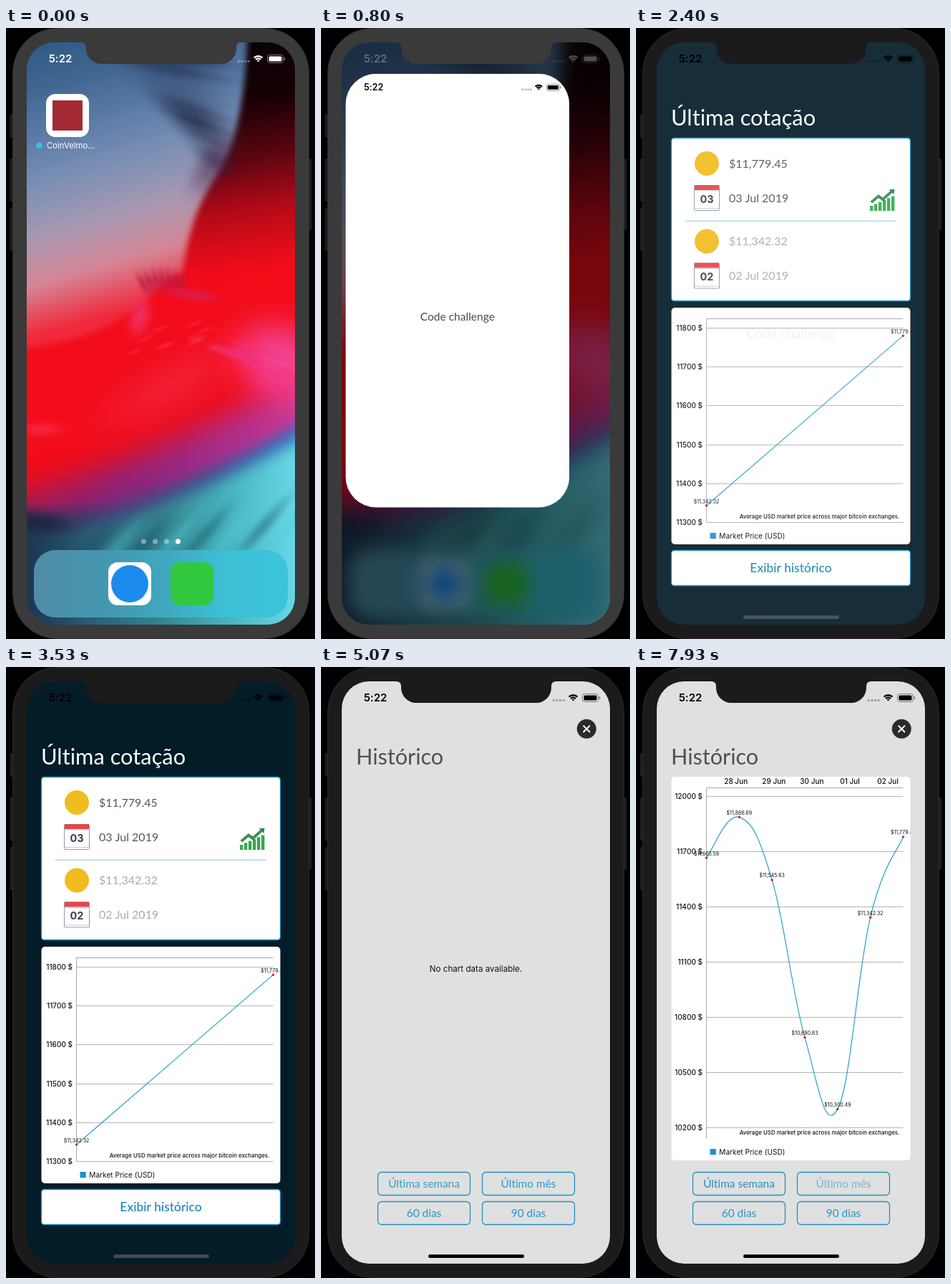
Animation of 432 by 852 pixels, one loop 8 s. Source, as an HTML page with a canvas:

```html
<!DOCTYPE html>
<html lang="pt">
<head>
<meta charset="utf-8">
<title>Cotação</title>
<style>
html, body { margin: 0; width: 100%; height: 100%; overflow: hidden; background: #000; }
canvas { display: block; width: 100vw; height: 100vh; }
</style>
</head>
<body>
<canvas id="stage" width="432" height="852"></canvas>
<script>
const W = 432, H = 852, LOOP = 8000;
const SCREEN = { x: 29, y: 20, w: 375, h: 812 }, MID = 216.5;
const UI = 'Inter, sans-serif', TEXT = 'Lato, sans-serif';
const BLUE = '#1b93c6', NAVY = '#031c28';
const stage = document.getElementById('stage').getContext('2d');
let c = stage;

const clamp = v => Math.max(0, Math.min(1, v));
const mix = (a, b, p) => a + (b - a) * p;
const smooth = v => { v = clamp(v); return v * v * (3 - 2 * v); };
const spring = (ms, rate) => {
  const k = Math.max(0, ms) / 1000 * rate;
  return 1 - (1 + k) * Math.exp(-k);
};
const repeat = (n, fn) => { for (let i = 0; i < n; i++) fn(i, i / (n - 1)); };
function seeded(s) {
  return () => (s = s * 16807 % 2147483647) / 2147483647;
}

function box(x, y, w, h, r, fill, stroke, lw = 1) {
  c.beginPath();
  c.roundRect(x, y, w, h, r);
  if (fill) { c.fillStyle = fill; c.fill(); }
  if (stroke) { c.strokeStyle = stroke; c.lineWidth = lw; c.stroke(); }
}
function disc(x, y, r, fill) {
  c.beginPath();
  c.arc(x, y, r, 0, 7);
  c.fillStyle = fill;
  c.fill();
}
function line(pts, color, lw = 1) {
  c.beginPath();
  pts.forEach(([x, y]) => c.lineTo(x, y));
  c.strokeStyle = color;
  c.lineWidth = lw;
  c.stroke();
}
// y is the middle of the capitals; the tiny spacing turns ligatures off
function label(s, x, y, size, color, align = 'left', font = TEXT, weight = 400) {
  c.font = `${weight} ${size}px ${font}`;
  c.letterSpacing = '0.01px';
  c.textAlign = align;
  c.fillStyle = color;
  c.fillText(s, x, y + size * 0.36);
}
function faded(alpha, draw) {
  c.save();
  c.globalAlpha *= alpha;
  draw();
  c.restore();
}
function layer(draw) {
  const cv = document.createElement('canvas'), prev = c;
  cv.width = W;
  cv.height = H;
  c = cv.getContext('2d');
  draw();
  c = prev;
  return cv;
}

// Wallpaper

function ramp(x0, y0, x1, y1, ...colors) {
  const g = c.createLinearGradient(x0, y0, x1, y1);
  colors.forEach((color, i) => g.addColorStop(i / (colors.length - 1), color));
  return g;
}
function haze(blur, fill, path) {
  c.filter = `blur(${blur}px)`;
  c.fillStyle = fill;
  c.fill(new Path2D(path));
  c.filter = 'none';
}
// soft ellipse, rgb given as 'r,g,b'
function glow(x, y, rx, ry, turn, rgb, alpha) {
  c.save();
  c.translate(x, y);
  c.rotate(turn);
  c.scale(rx, ry);
  const g = c.createRadialGradient(0, 0, 0, 0, 0, 1);
  [1, 0.85, 0.5, 0.15, 0].forEach((a, i) => g.addColorStop(i / 4, `rgba(${rgb},${a * alpha})`));
  disc(0, 0, 1, g);
  c.restore();
}
// everything below a sagging curve
function slope(blur, fill, y0, sag, y1) {
  haze(blur, fill, `M-20 ${y0}Q130 ${sag} 450 ${y1}V900H-20Z`);
}

function wallpaper() {
  const rnd = seeded(7);
  c.fillStyle = '#f30c19';
  c.fillRect(0, 0, W, H);
  haze(7, ramp(340, 20, 390, 330, '#090205', '#170004', '#5a0510', '#b80a18', '#f30c19'),
    'M340-20H460V360L235 345Z');
  haze(4, ramp(0, 20, 110, 410, '#2c5983', '#3f6490', '#5a7aa6', '#7b8fb5', '#a598b2', '#d58595', '#f0293b'),
    'M-20-20H338C335 240 270 170 247 342C190 355 195 440 -20 450Z');
  repeat(9, (i, p) => glow(mix(225, 290, p), 40 + i * 18, mix(130, 50, p), 17, mix(0.15, 0.5, p),
    '26,36,64', 0.5 + 0.25 * Math.cos(i * 1.3)));
  glow(290, 190, 70, 34, -1, '70,24,60', 0.5);

  repeat(7, i => glow(192 + i * 9, 358 - 6 * Math.sin(i / 2), 9, 26, -0.5 + i * 0.1, '190,24,66', 0.75));
  glow(262, 372, 56, 13, 0.15, '220,30,80', 0.85);
  glow(187, 402, 24, 42, 0.2, '240,55,110', 0.8);
  repeat(12, () => glow(180 + rnd() * 120, 410 + rnd() * 45, 18, 5, -0.4, '245,50,80', 0.45));
  glow(50, 560, 45, 16, 0, '245,55,85', 0.6);
  glow(230, 500, 170, 60, -0.5, '238,45,75', 0.5);

  slope(22, ramp(29, 0, 404, 0, '#9a1c58', '#86247a', '#9c2c8c', '#c83a98'), 655, 640, 470);
  glow(385, 465, 105, 85, 0.5, '244,70,150', 1);
  repeat(14, () => glow(300 + rnd() * 90, 430 + rnd() * 80, 38, 8, 0.4, '240,50,130', 0.5));
  slope(9, ramp(29, 0, 404, 0, '#28304f', '#4a3f7c', '#3e5590', '#3a6cc0'), 662, 720, 528);
  slope(10, ramp(29, 0, 404, 0, '#1c3450', '#2a6078', '#34848f', '#46b4be', '#68d8e6'), 690, 738, 552);
  repeat(8, (i, p) => glow(mix(110, 400, p), mix(735, 690, p), 85, mix(12, 20, rnd()), -0.85,
    i % 2 ? '80,205,215' : '20,74,96', 0.4));
  glow(50, 690, 60, 22, 0.1, '26,34,62', 0.8);
}

function homeScreen() {
  wallpaper();
  box(56, 92, 60, 60, 13, '#fff');
  box(65, 101, 42, 42, 0, '#a32a35');
  disc(46.5, 164, 4.3, '#3cbfe6');
  label('CoinVelmo...', 57, 164, 11.3, '#fff', 'left', UI);
  repeat(4, i => disc(192.5 + i * 16, 716, 3.5, i < 3 ? 'rgba(255,255,255,.4)' : '#fff'));
  box(39, 728, 355, 94, 30, ramp(39, 0, 394, 0, '#528ba5', '#4595ae', '#40a6bd', '#3cc0d4', '#3cc4da'));
  box(143, 745, 60, 60, 13, '#fff');
  disc(173, 775, 26, '#1c8bee');
  box(230, 745, 60, 60, 13, '#2fc83f');
}

// Shared parts

function statusBar(color) {
  label('5:22', 76, 43, 15, color, 'center', UI, 600);
  faded(0.28, () => repeat(4, i => disc(325.3 + i * 4.7, 46.5, 1.8, color)));
  c.strokeStyle = color;
  c.lineWidth = 2.4;
  for (const r of [1.5, 4.9, 8.3]) {
    c.beginPath();
    c.arc(352.6, 47.5, r, -Math.PI * 0.75, -Math.PI * 0.25);
    c.stroke();
  }
  faded(0.45, () => {
    box(365.5, 37.5, 22, 11, 3, null, color);
    box(388.6, 41, 1.6, 4, 1, color);
  });
  box(367.5, 39.5, 18, 7, 1.6, color);
}

const indicator = color => box(150, 819.3, 134, 4.8, 2.4, color);

function splash() {
  c.fillStyle = '#fff';
  c.fillRect(SCREEN.x, SCREEN.y, SCREEN.w, SCREEN.h);
  label('Code challenge', MID, 426, 18.6, '#4a4a4a', 'center');
}

// Charts

const money = v => '$' + v.toLocaleString('en-US', { minimumFractionDigits: 2 });
const shortDate = d => new Date(2019, 5, d).toLocaleDateString('en-GB', { day: '2-digit', month: 'short' });

function chart({ y, h, first, last, max, min, step, values, days = 0 }) {
  const left = 98.5, right = 373.5, top = y + 15.5;
  const Y = v => mix(first, last, (max - v) / (max - min));
  const pts = values.map((v, i) => [mix(left, right, i / (values.length - 1)), Y(v)]);
  const at = i => pts[Math.max(0, Math.min(pts.length - 1, i))];
  c.save();
  box(49.5, y, 334, h, 5, '#fff');
  c.clip();
  for (let v = max; v >= min; v -= step) {
    const gy = Math.round(Y(v)) + 0.5;
    line([[left, gy], [right, gy]], '#b4b4b4');
    label(`${v} $`, 93, gy - 0.5, 10, '#111', 'right', UI, 500);
  }
  line([[right, top], [left, top], [left, y + h - 30.5]], '#a8a8a8');
  repeat(days, i => label(shortDate(28 + i), 139.7 + i * 53.1, y + 6.5, 10, '#111', 'center', UI, 500));

  c.beginPath();
  c.moveTo(...pts[0]);
  for (let i = 1; i < pts.length; i++) {
    const [before, p, q, after] = [at(i - 2), at(i - 1), at(i), at(i + 1)];
    const bend = 0.2;
    c.bezierCurveTo(p[0] + (q[0] - before[0]) * bend, p[1] + (q[1] - before[1]) * bend,
      q[0] - (after[0] - p[0]) * bend, q[1] - (after[1] - p[1]) * bend, ...q);
  }
  c.strokeStyle = '#2a9ec4';
  c.lineWidth = 1.2;
  c.stroke();
  pts.forEach(([px, py], i) => {
    disc(px, py, 1.7, '#c8202c');
    label(money(values[i]), px, py - 6, 7, '#111', 'center', UI);
  });
  label('Average USD market price across major bitcoin exchanges.', 368.5, y + h - 39, 7.9, '#111', 'right', UI, 500);
  box(103.5, y + h - 16, 8.3, 8.3, 0, '#1e8fdd');
  label('Market Price (USD)', 116.3, y + h - 11.7, 10.1, '#111', 'left', UI);
  c.restore();
}

const prices = [11665.58, 11886.89, 11545.63, 10690.83, 10300.49, 11342.32, 11779.45];
const latest = { y: 390, h: 330, first: 418, last: 689, max: 11800, min: 11300, step: 100, values: prices.slice(-2) };
const week = { y: 153, h: 535, first: 180.3, last: 642.4, max: 12000, min: 10200, step: 300, values: prices, days: 5 };

// Quotes

function calendar(y, day) {
  box(81.5, y + 0.5, 35, 35, 1, '#fff', '#8f98b5');
  box(82, y, 34, 7, 0, '#e2474c');
  for (const dy of [8, 32.5]) line([[82, y + dy], [116, y + dy]], '#c6cad8');
  label(day, 99, y + 19.5, 14.5, '#3b4048', 'center', UI, 700);
}

function growthIcon() {
  repeat(6, i => box(327 + i * 6, 248 - i * 2.7, 4.4, 7 + i * 2.7, 0, '#36a852'));
  const path = [[329, 243], [339, 234.5], [345, 239], [358, 227.5]];
  line(path, '#1d4a33', 3.6);
  line(path, '#35b04f', 1.8);
  c.fillStyle = '#2b8a45';
  c.fill(new Path2D('M361.5 224.5l-1 7.5l-7-6.5z'));
}

function quote(y, price, day, color) {
  disc(99, y, 17, '#f0bc1f');
  label(price, 130, y, 16, color);
  calendar(y + 30, day);
  label(`${day} Jul 2019`, 130, y + 48, 16, color);
}

function quotesScreen() {
  c.fillStyle = NAVY;
  c.fillRect(0, 0, W, H);
  label('Última cotação', 49, 124.5, 30.8, '#fff');
  box(49.5, 153.5, 334, 227, 4, '#fff', BLUE, 1.3);
  quote(189, money(prices[6]), '03', '#555');
  growthIcon();
  line([[69, 269], [364, 269]], '#acd6e6', 1.3);
  quote(297.5, money(prices[5]), '02', '#aaa');
  chart(latest);
  box(49.5, 728.5, 334, 49, 4, '#fff', BLUE, 1.3);
  label('Exibir histórico', MID, 753, 17.4, '#1787b5', 'center', TEXT, 500);
  indicator('#434b50');
}

// History

function periodButton(name, i, alpha) {
  const x = 79.5 + i % 2 * 146, y = 704.5 + Math.floor(i / 2) * 41;
  box(x, y, 129, 32, 5, null, BLUE, 1.3);
  faded(alpha, () => label(name, x + 64.5, y + 16, 15.4, '#1a92c8', 'center'));
}

function historyScreen(t) {
  c.fillStyle = '#e0e0e0';
  c.fillRect(SCREEN.x, SCREEN.y, SCREEN.w, SCREEN.h);
  disc(371.3, 86.3, 13.5, '#2b2b2d');
  for (const d of [-4.7, 4.7]) line([[371.3 - d, 81.6], [371.3 + d, 91]], '#fff', 2);
  label('Histórico', 49, 124.5, 30.6, '#505050');
  if (t >= 5650) chart(week);
  else label('No chart data available.', MID, 421, 11.6, '#111', 'center', UI);
  periodButton('Última semana', 0, mix(0.85, 1, clamp((t - 7450) / 80)));
  periodButton('Último mês', 1, mix(0.9, 0.55, clamp((t - 7640) / 240)));
  periodButton('60 dias', 2, 0.95);
  periodButton('90 dias', 3, 0.95);
}

// Scenes

const home = layer(homeScreen);
const dimHome = layer(() => {
  c.filter = 'blur(12px) brightness(.5)';
  c.drawImage(home, 0, 0);
});
const quotes = layer(quotesScreen);

function launch(t) {
  const p = spring(t - 600, 15);
  c.drawImage(home, 0, 0);
  faded(clamp(p * 1.3), () => c.drawImage(dimHome, 0, 0));
  faded(1 - 0.7 * clamp(p * 1.25), () => statusBar('#fff'));
  if (p <= 0) return;

  // the window grows from the icon, its height lagging behind
  const w = mix(60, SCREEN.w, p), h = mix(60, SCREEN.h, p ** 1.47), k = w / SCREEN.w;
  const x = mix(86, MID, p) - w / 2, y = mix(122, 426, p) - h / 2;
  faded(clamp(p * 4), () => {
    c.beginPath();
    c.roundRect(x, y, w, h, 14 + 36 * p);
    c.clip();
    c.translate(x, y);
    c.scale(k, k);
    c.translate(-SCREEN.x, -SCREEN.y);
    splash();
    statusBar('#000');
  });
}

function app(t) {
  c.drawImage(quotes, 0, 0);
  faded(1 - smooth((t - 2070) / 400), () => {
    splash();
    indicator('#000');
  });
  if (t >= 4370) {
    c.save();
    c.translate(0, SCREEN.h * (1 - spring(t - 4294, 18.26)));
    historyScreen(t);
    c.restore();
    indicator('#000');
  }
  statusBar('#000');
}

function draw(t) {
  const early = t < 925, body = early ? '#3a3a3a' : '#1b1b1b';
  c.fillStyle = '#000';
  c.fillRect(0, 0, W, H);
  for (const [x, y, h] of [[5.5, 120, 33], [5.5, 182, 60], [5.5, 251, 60], [422, 182, 100]])
    box(x, y, 5.5, h, 1.5, '#1d1d1d');
  box(9.5, 0.5, 414, 851, 62, body, early ? '#303030' : '#2b2b2b');
  c.save();
  c.beginPath();
  c.roundRect(SCREEN.x, SCREEN.y, SCREEN.w, SCREEN.h, 38);
  c.clip();
  if (t < 1300) launch(t); else app(t);
  c.restore();
  c.fillStyle = body;
  c.fill(new Path2D('M105 19v1q7 0 7 7v2a21 21 0 0 0 21 21h168a21 21 0 0 0 21-21v-2q0-7 7-7v-1z'));
}

function tick(now) {
  draw(now % LOOP);
  requestAnimationFrame(tick);
}
requestAnimationFrame(tick);
</script>
</body>
</html>
```
